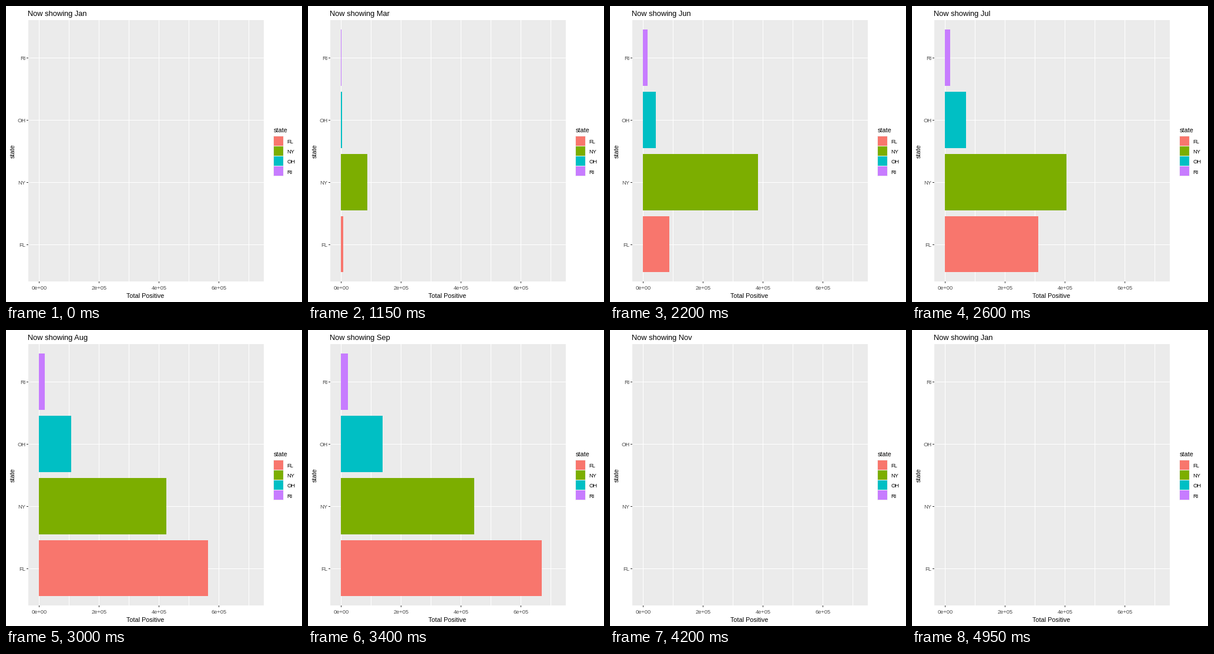
Animation of 504x504 px, one loop 5 s. Source, as a matplotlib script:

```python
import matplotlib.pyplot as plt
import numpy as np
from matplotlib.animation import FuncAnimation
from matplotlib.patches import Rectangle

SIZE = 504
FRAMES, INTERVAL = 100, 50
TWEEN = 4  # steps from one month's values to the next

plt.rcParams["font.family"] = "Liberation Sans"
TITLE, LABEL, TICK = 12.9, 10.7, 9.4
PANEL, KEY, GREY, DARK = "#EBEBEB", "#F2F2F2", "#4D4D4D", "#333333"
LEFT, TOP, RIGHT, BOTTOM = 38, 24, 439, 469
ZERO_X, PX_PER_THOUSAND = 56, 0.51

MONTHS = "Jan Feb Mar Apr May Jun Jul Aug Sep Oct Nov Dec".split()
STARTS = np.array([0, 8, 17, 26, 35, 44, 52, 60, 68, 76, 84, 92, 100])
STATES = ["FL", "NY", "OH", "RI"]
COLORS = ["#F8766D", "#7CAE00", "#00BFC4", "#C77CFF"]

# Average positives in thousands (FL, NY, OH, RI)
TOTALS = {
    "Mar": (3.2, 48, 1.1, 0.25),
    "Apr": (21, 207, 9.5, 4.5),
    "May": (45, 345.5, 27.5, 12),
    "Jun": (88.5, 385, 43, 16),
    "Jul": (311, 406, 70, 17.8),
    "Aug": (564.5, 425, 107.5, 20.4),
    "Sep": (670, 446, 139, 23.3),
    "Oct": (715, 464, 158.5, 25.2),
}

fig = plt.figure(figsize=(SIZE / 72, SIZE / 72), dpi=72, facecolor="white")
ax = fig.add_axes([0, 0, 1, 1])
ax.set_xlim(0, SIZE)
ax.set_ylim(SIZE, 0)
ax.axis("off")


def box(x0, y0, x1, y1, color, z=1):
    patch = Rectangle((x0, y0), x1 - x0, y1 - y0, facecolor=color,
                      linewidth=0, antialiased=False, zorder=z)
    return ax.add_patch(patch)


def label(x, y, text, size, color="black", ha="left", **kwargs):
    return ax.text(x, y, text, size=size, color=color, ha=ha,
                   va="baseline", **kwargs)


def draw_panel():
    box(LEFT, TOP, RIGHT, BOTTOM, PANEL)
    for i in range(8):
        x = ZERO_X + 51 * i
        box(x, TOP, x + 1, BOTTOM, "white", 2)
        if i % 2 == 0 and i < 8 - 1:
            box(x, BOTTOM, x + 1, BOTTOM + 3, DARK, 2)
            label(x + 0.5, 483, f"{i}e+{'05' if i else '00'}", TICK, GREY, "center")
    for i, state in enumerate(STATES):
        y = 406 - 106 * i
        box(LEFT, y, RIGHT, y + 1, "white", 2)
        box(LEFT - 3, y, LEFT, y + 1, DARK, 2)
        label(33.3, y + 4, state, TICK, GREY, "right")
    label(237.5, 497, "Total Positive", LABEL, ha="center")
    label(15, 247.5, "state", LABEL, ha="center", rotation=90,
          rotation_mode="anchor")


def draw_legend():
    label(456, 215, "state", LABEL)
    box(455, 221, 473, 290, KEY)
    for i, (state, color) in enumerate(zip(STATES, COLORS)):
        y = 229.6 + 17.28 * i
        box(456, round(y - 8), 472, round(y + 7.9), color, 2)
        label(478.5, round(y + 4.2), state, TICK)


def totals(month):
    return np.array(TOTALS.get(MONTHS[month % 12], (0,) * 4), dtype=float)


def values_at(frame):
    month = np.searchsorted(STARTS, frame, side="right") - 1
    now, following = totals(month), totals(month + 1)
    if not (now.any() and following.any()):
        return now
    progress = max(0, TWEEN - (STARTS[month + 1] - frame)) / TWEEN
    return now + (following - now) * progress


draw_panel()
draw_legend()
title = label(37.2, 17, "", TITLE)
bars = []
for i, color in enumerate(COLORS):
    top = 358 - 106 * i
    bars.append(box(ZERO_X, top, ZERO_X, top + (96 if i else 95), color, 3))


def update(frame):
    # The title switches one frame before the new values settle
    month = np.searchsorted(STARTS, frame + 1, side="right") - 1
    title.set_text(f"Now showing {MONTHS[month % 12]}")
    for bar, value in zip(bars, values_at(frame)):
        bar.set_width(round(value * PX_PER_THOUSAND))
    return [title, *bars]


anim = FuncAnimation(fig, update, frames=FRAMES, interval=INTERVAL,
                     repeat=True, repeat_delay=0, blit=False)
plt.show()
```
